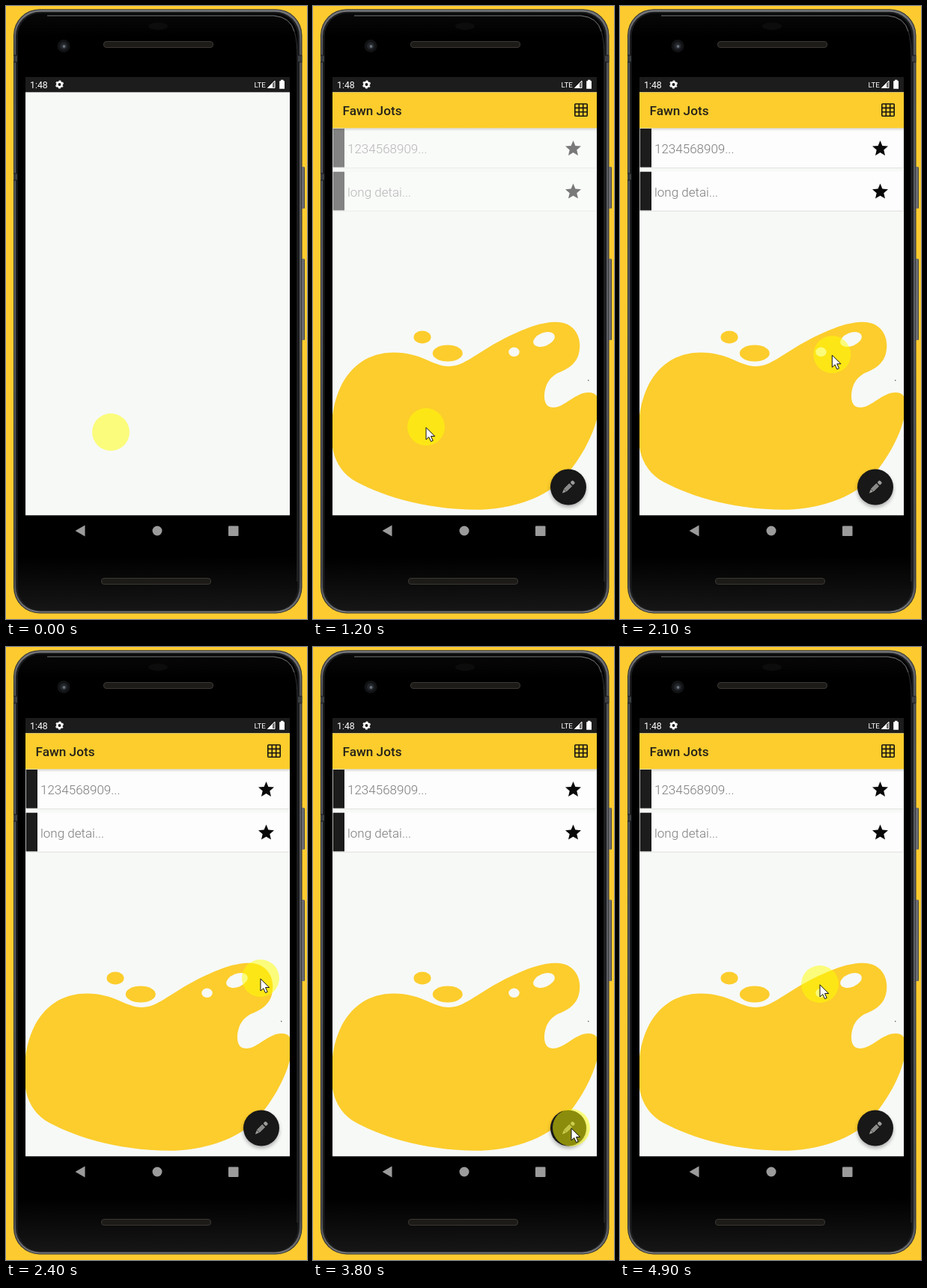
These frames come from a looping animation (402 by 820 pixels, 5000 ms). An HTML page:

```html
<!DOCTYPE html>
<html lang="en">
<head>
<meta charset="utf-8">
<title>Notes app</title>
<style>
  html, body { margin: 0; width: 100%; height: 100%; overflow: hidden; background: #fdcb2f; }
  svg { display: block; width: 402px; height: 820px; }
  text { font-family: Roboto, "Noto Sans", sans-serif; }
  .note { font-size: 17px; font-weight: 300; fill: #7b7b7b; }
</style>
</head>
<body>
<svg viewBox="0 0 402 820" xmlns="http://www.w3.org/2000/svg">
  <defs>
    <linearGradient id="rim" x2="0" y2="1">
      <stop offset="0" stop-color="#77787b"/>
      <stop offset=".06" stop-color="#55575b"/>
      <stop offset=".5" stop-color="#5d5f64"/>
      <stop offset=".94" stop-color="#4a4b4e"/>
      <stop offset="1" stop-color="#737476"/>
    </linearGradient>
    <linearGradient id="glass" x2="0" y2="1">
      <stop offset="0" stop-color="#080808"/>
      <stop offset=".04" stop-color="#000"/>
      <stop offset=".91" stop-color="#000"/>
      <stop offset="1" stop-color="#161616"/>
    </linearGradient>
    <linearGradient id="key" x2="1" y2="0">
      <stop offset="0" stop-color="#2a2a2b"/>
      <stop offset=".6" stop-color="#8a8b8e"/>
      <stop offset="1" stop-color="#3a3a3c"/>
    </linearGradient>
    <linearGradient id="fall" x2="0" y2="1">
      <stop offset="0" stop-color="#000" stop-opacity=".16"/>
      <stop offset="1" stop-color="#000" stop-opacity="0"/>
    </linearGradient>
    <filter id="soft" x="-30%" y="-30%" width="160%" height="160%">
      <feGaussianBlur stdDeviation="2.5"/>
    </filter>
    <clipPath id="view"><rect x="26" y="115.300" width="353" height="566"/></clipPath>
    <path id="star" d="M0 5.200 6.500 9.100 4.800 1.700 10.500-3.300 2.900-3.900 0-10.900-2.900-3.900-10.500-3.300-4.800 1.700-6.500 9.100Z"/>
  </defs>

  <rect width="402" height="820" fill="#fdcb2f"/>

  <!-- phone -->
  <g>
    <rect x="392" y="215" width="7" height="56" rx="1.500" fill="url(#key)"/>
    <rect x="392" y="338" width="7" height="109" rx="1.500" fill="url(#key)"/>
    <rect x="10" y="4.200" width="385.500" height="808.300" rx="35" fill="#2e2f31"/>
    <rect x="11" y="5.200" width="383.500" height="806.300" rx="34" fill="url(#rim)"/>
    <rect x="13" y="7.700" width="379" height="801.800" rx="32.500" fill="#1b1c1e"/>
    <path d="M10 66h5v9h-5zM390 66h5.500v9h-5.500zM10 224h5v9h-5z" fill="#3c3e42"/>
    <path d="M10 66h5M10 75h5M390 66h5M390 75h5M10 224h5M10 233h5" stroke="#17181a"/>
    <rect x="15.500" y="9.500" width="374" height="799" rx="31" fill="url(#glass)"/>
    <path d="M55 13H358Q380 15 385 34" fill="none" stroke="#77787b"/>
    <path d="M385 34Q389 45 389 70V770" fill="none" stroke="#343538"/>
    <ellipse cx="203" cy="27" rx="13" ry="5" fill="#0c0c0d"/>
    <circle cx="77" cy="53.500" r="8.500" fill="#121315"/>
    <circle cx="77" cy="53.500" r="5" fill="#23262a"/>
    <circle cx="77.500" cy="54" r="2" fill="#687078"/>
    <g fill="#1d1b18" stroke="#3b3834">
      <rect x="130.500" y="47.500" width="146" height="8" rx="3.500"/>
      <rect x="127.500" y="765.500" width="146" height="8" rx="3.500"/>
    </g>
    <g fill="#9b9b9b">
      <path d="M92.500 702 105.500 694.500V709.500Z"/>
      <circle cx="202" cy="702" r="6.500"/>
      <rect x="297" y="695.500" width="13.500" height="13.500" rx="1"/>
    </g>
  </g>

  <!-- status bar -->
  <rect x="26" y="95" width="353" height="20.300" fill="#1c1c1c"/>
  <g fill="#fff">
    <text x="32" y="109.500" font-size="12.300">1:48</text>
    <g transform="translate(71.500 105)" fill="none" stroke="#fff">
      <circle r="3.200" stroke-width="2.500"/>
      <circle r="4.900" stroke-width="1.300" stroke-dasharray="2.600 2.531" stroke-dashoffset="1.300" transform="rotate(30)"/>
    </g>
    <text x="331.500" y="108.800" font-size="9.800">LTE</text>
    <path d="M349.500 109.500 359 100V109.500Z" fill="#666" stroke="#fff"/>
    <path d="M349 110 356 103V110Z"/>
    <path d="M367 98.800h3.500v1.400h1.500v10.600h-6.800v-10.600h1.800z"/>
  </g>

  <rect x="26" y="115.300" width="353" height="566" fill="#f7f9f7"/>

  <g id="app" clip-path="url(#view)">
    <path fill="#fccd2c" d="M26 548C32 500 60 463.500 108 463.500C145 463.500 160 482 181 482C202 482 215 466 255 445C285 430 305 422.700 325 422.700C345 422.700 356.300 437 356.300 454C356.300 480 338 486 325 492C312 500 309 513 309 522C309 533 314 537 321 537C336 537 350 517 368 517Q376 517 379 522V553C372 580 355 608 338 628C318 652 280 671 225 673.700C150 675 85 653 52 633C36 622 28 605 26 590Z"/>
    <ellipse cx="146" cy="443" rx="11.500" ry="8.500" fill="#fccd2c"/>
    <ellipse cx="179.800" cy="464.500" rx="20" ry="11" fill="#fccd2c"/>
    <ellipse cx="308.500" cy="446" rx="15" ry="8.800" transform="rotate(-22 308.500 446)" fill="#f7f9f7"/>
    <ellipse cx="268.500" cy="462.800" rx="7.200" ry="6.200" fill="#f7f9f7"/>
    <rect x="367" y="500" width="1.400" height="1.400" fill="#666"/>

    <g id="list"></g>

    <rect x="26" y="163.300" width="353" height="4" fill="url(#fall)"/>
    <rect x="26" y="115.300" width="353" height="48" fill="#fccd2c"/>
    <text x="39.500" y="146" font-size="17.200" font-weight="500" fill="#25211a">Fawn Jots</text>
    <g id="grid" fill="none" stroke="#171512" stroke-width="1.600">
      <rect x="349.800" y="131" width="16.400" height="16.200" rx="1"/>
      <path d="M355.300 131V147M360.700 131V147M350 136.400H366M350 141.800H366"/>
    </g>

    <circle cx="341" cy="646.500" r="24" fill="#000" opacity=".3" filter="url(#soft)"/>
    <circle cx="341" cy="643.500" r="24" fill="#181818"/>
    <g transform="translate(341 643.500) rotate(-45)" fill="#9c9c9a">
      <path d="M-11.500 0-6.500-2.200V2.200Z"/>
      <rect x="-6" y="-2.600" width="10.500" height="5.200"/>
      <rect x="6" y="-2.600" width="4.500" height="5.200" rx="1.500"/>
      <path d="M-6-.9H4.500M-6 .9H4.500" stroke="#5c5c5c" stroke-width=".7"/>
    </g>
  </g>

  <g id="pointer">
    <circle r="25" fill="#ff0" opacity=".5"/>
    <path id="arrow" d="M0 .8V17L3.800 13.600 6.500 19.600 9.200 18.400 6.500 12.500H11.700Z" fill="#fff" stroke="#111" stroke-linejoin="round"/>
  </g>
</svg>

<script>
const LOOP = 5000, STEP = 100;
const el = id => document.getElementById(id);
const show = (id, on) => el(id).setAttribute("visibility", on ? "visible" : "hidden");

// [ms, x, y]
const path = [
  [0, 140, 570], [300, 142, 565], [900, 145, 565], [1200, 151, 563],
  [1700, 191, 520], [2400, 340, 443], [2700, 352, 470], [3300, 349, 620],
  [3600, 345, 643], [4100, 345, 643], [4500, 318, 560], [4900, 267, 451]
];
// [ms, opacity]
const fade = [[900, 0], [1200, .53], [1700, .95], [2000, 1]];

const card = (y, label) => `
  <rect x="26.500" y="${y + 1}" width="352" height="52.300" rx="1.500" fill="#e5e7e4"/>
  <rect x="26.500" y="${y}" width="352" height="52" rx="1.500" fill="#fcfdfc"/>
  <rect x="26.700" y="${y}" width="15.300" height="51.700" fill="#1c1c1c"/>
  <text class="note" x="46" y="${y + 33}">${label}</text>
  <use href="#star" x="347.500" y="${y + 26.800}" fill="#090909"/>`;
el("list").innerHTML = card(164, "1234568909...") + card(221.700, "long detai...");

// Monotone cubic through table rows, column c
function sample(rows, t, c) {
  const last = rows.length - 1;
  if (t <= rows[0][0]) return rows[0][c];
  if (t >= rows[last][0]) return rows[last][c];
  const i = rows.findIndex(r => r[0] > t) - 1;
  const slope = k => (rows[k + 1][c] - rows[k][c]) / (rows[k + 1][0] - rows[k][0]);
  const tangent = k => {
    if (k === 0) return slope(0);
    if (k === last) return slope(last - 1);
    const a = slope(k - 1), b = slope(k);
    return a * b <= 0 ? 0 : 2 * a * b / (a + b);
  };
  const h = rows[i + 1][0] - rows[i][0], u = (t - rows[i][0]) / h, v = 1 - u;
  return rows[i][c] * (1 + 2 * u) * v * v + h * tangent(i) * u * v * v
    + rows[i + 1][c] * u * u * (3 - 2 * u) - h * tangent(i + 1) * u * u * v;
}

function draw(ms) {
  const t = Math.floor((ms % LOOP) / STEP) * STEP;
  show("app", t >= 200);
  show("grid", t >= 900);
  show("arrow", t >= 100);
  el("list").setAttribute("opacity", sample(fade, t, 1));
  el("pointer").setAttribute("transform", `translate(${sample(path, t, 1)} ${sample(path, t, 2)})`);
}

const start = performance.now();
function tick() {
  draw(performance.now() - start);
  requestAnimationFrame(tick);
}
tick();
</script>
</body>
</html>
```
